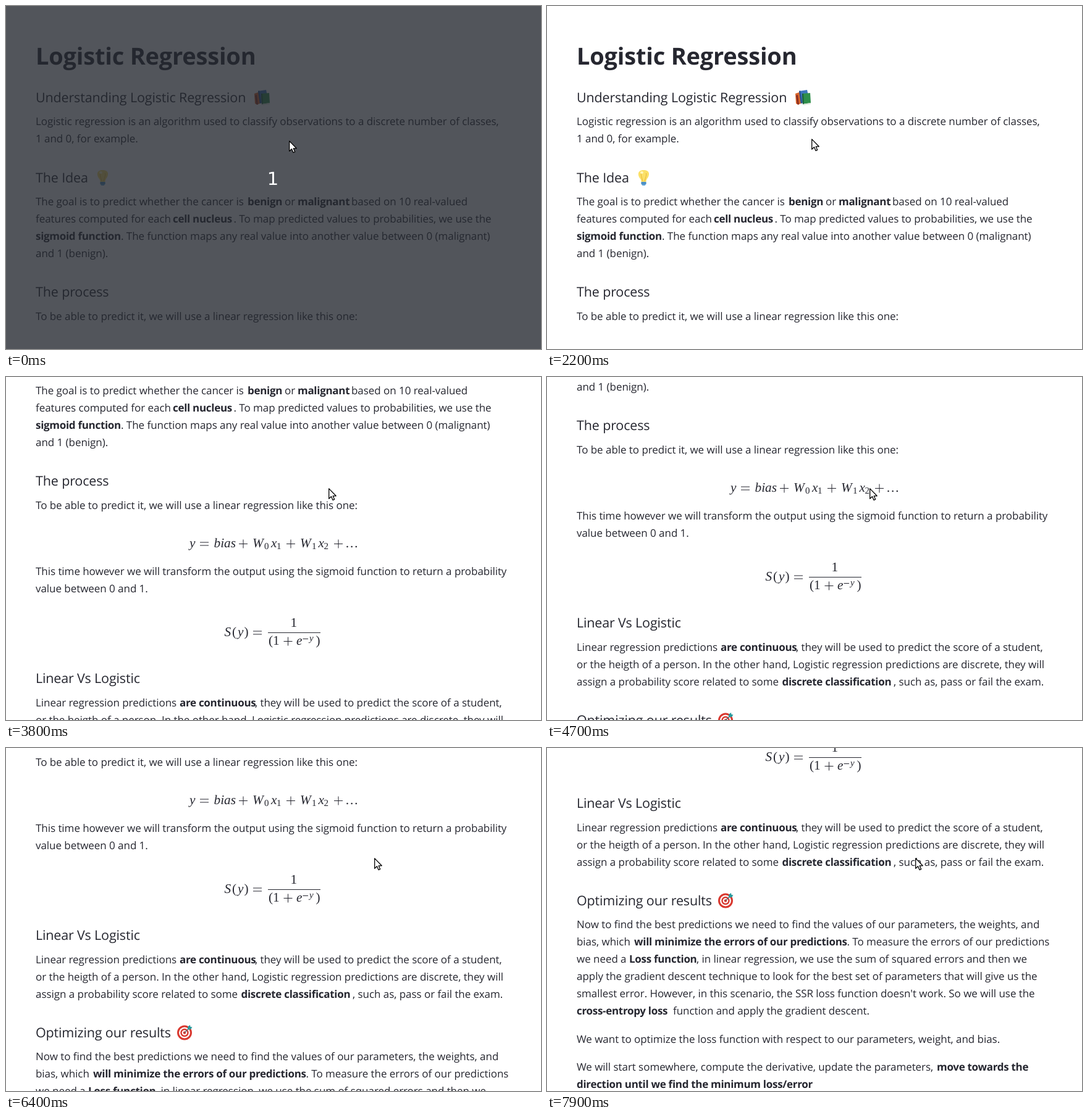
Animation of 866x556 px, one loop 8 s. Source, as an HTML page:

```html
<!DOCTYPE html>
<html lang="en">
<head>
<meta charset="utf-8">
<title>Logistic Regression</title>
<style>
  html, body { margin: 0; width: 100%; height: 100%; overflow: hidden; background: #fff; }
  svg { display: block; width: 866px; height: 556px; }
  text { fill: #262730; text-rendering: geometricPrecision; white-space: pre; }
  .h1, .h3, .p, .b { font-family: "Open Sans", "Noto Sans", sans-serif; }
  .h1 { font-size: 38px; font-weight: 700; letter-spacing: -.2px; }
  .h3 { font-size: 21.5px; font-weight: 500; letter-spacing: -.15px; }
  .p { font-size: 17px; letter-spacing: -.05px; }
  .b { font-size: 17px; font-weight: 700; letter-spacing: -.3px; }
  .m, .v, .s, .sv { font-family: "Liberation Serif", "Noto Serif", serif; }
  .m, .v { font-size: 21.3px; }
  .s, .sv { font-size: 15px; }
  .v, .sv { font-style: italic; }
  .ops { stroke: #262730; stroke-width: 1; fill: none; }
  .count { font: 29px "DejaVu Sans", sans-serif; fill: #fff; text-anchor: middle; }
</style>
</head>
<body>
<svg viewBox="0 0 866 556">
  <g id="page"></g>
  <g id="veil">
    <rect width="866" height="556" fill="rgb(36,40,47)" fill-opacity=".79"/>
    <text class="count" x="432" y="290">1</text>
  </g>
  <path id="arrow" d="M.7 .9V17.3L4.5 13.8 7 19.6 9.7 18.4 7.2 12.8H12.2Z"
        fill="#fff" stroke="#000" stroke-width="1.3" stroke-linejoin="round"/>
  <g id="beam" fill="none">
    <path d="M-3.5 -7H-1L0 -6 1 -7H3.5M0 -6V6M-3.5 7H-1L0 6 1 7H3.5" stroke="#fff" stroke-width="3"/>
    <path d="M-3.5 -7H-1L0 -6 1 -7H3.5M0 -6V6M-3.5 7H-1L0 6 1 7H3.5" stroke="#000" stroke-width="1.3"/>
  </g>
</svg>
<script>
const LOOP = 8000;
const $ = id => document.getElementById(id);

const text = (cls, x, y, s) => `<text class="${cls}" x="${x}" y="${y}">${s}</text>`;
const heading = (y, s) => text('h3', 48, y + 8, s);

// A line is a row of runs: x, string, x, string ... ; "*" marks bold.
function line(y, ...runs) {
  let out = '';
  for (let i = 0; i < runs.length; i += 2) {
    const s = runs[i + 1], bold = s[0] === '*';
    out += text(bold ? 'b' : 'p', runs[i], y + 6, bold ? s.slice(1) : s);
  }
  return out;
}
const para = (y, ...rows) => rows.map((s, i) => line(y + 28 * i, 48, s)).join('');

// Operators are centred on x and the math axis y.
const plus = (x, y) => `M${x - 7} ${y}h14M${x} ${y - 7}v14`;
const equal = (x, y) => `M${x - 7} ${y - 2.5}h14M${x - 7} ${y + 2.5}h14`;
const ops = d => `<path class="ops" d="${d}"/>`;

const linearFormula = [
  text('v', 297, 571, 'y'), text('v', 336.5, 571, 'bias'),
  text('v', 399, 571, 'W'), text('s', 418, 574, '0'),
  text('v', 429, 571, 'x'), text('s', 438, 574, '1'),
  text('v', 476, 571, 'W'), text('s', 495, 574, '1'),
  text('v', 505.5, 571, 'x'), text('s', 514.5, 574, '2'),
  text('m', 549, 571, '…'),
  ops(equal(321, 565.5) + plus(384, 565.5) + plus(461, 565.5) + plus(538, 565.5))
].join('');

const sigmoidFormula = [
  text('v', 353.5, 715, 'S'), text('m', 366, 715, '('),
  text('v', 375, 715, 'y'), text('m', 385.5, 715, ')'),
  text('m', 460.5, 700, '1'),
  text('m', 425, 729, '('), text('m', 432, 729, '1'),
  text('v', 470, 729, 'e'), text('sv', 491, 723, 'y'), text('m', 501.5, 729, ')'),
  ops(equal(407, 709.5) + 'M424 709.5H509' + plus(456.5, 723.5) + 'M480.5 719.5H489')
].join('');

const books = `<g transform="translate(402 136)">
  <path d="M0 6L9 3 14 20 4 24 1 22Z" fill="#d9652b"/>
  <path d="M1 9L3 23 6 24 4 8Z" fill="#8c2f22"/>
  <path d="M6 2L19 0 23 18 9 22Z" fill="#3f76bd"/>
  <path d="M6 2L8 1 11 21 9 22Z" fill="#274f8d"/>
  <path d="M11 6L24 5 25 21 12 23Z" fill="#2f8f4b"/>
  <path d="M11 6L13 6 14 23 12 24Z" fill="#1a5e38"/>
  <path d="M12 23L25 21V23L13 25Z" fill="#dfe5dc"/></g>`;

const bulb = `<g transform="translate(156.5 265)">
  <path d="M0 1C-12 1 -9 11 -5.5 15 -4.5 16.500 -4 18 -4 20H4C4 18 4.500 16.500 5.500 15 9 11 12 1 0 1Z" fill="#fbe067"/>
  <path d="M-4 6C-5 9 -3 13 -1.500 19M4 6C5 9 3 13 1.500 19" fill="none" stroke="#e8b53a"/>
  <ellipse cx="-3" cy="5" rx="2.500" ry="2" fill="#fff6bd"/>
  <path d="M-4 20H4V23.500L2 26H-2L-4 23.500Z" fill="#5b9fd2"/>
  <path d="M-4 22H4" stroke="#3572a8"/></g>`;

const target = '<g transform="translate(289 941.5)">' +
  [[12, '#d9382f'], [9, '#fff'], [6.7, '#d9382f'], [4.3, '#fff'], [2.3, '#d9382f']]
    .map(([r, c]) => `<circle r="${r}" fill="${c}"/>`).join('') +
  `<path d="M0 0L7 -7" stroke="#5a6870" stroke-width="1.500"/>
  <path d="M5 -6L5.500 -10 9 -12.500 9.500 -9.500 12.500 -9 10 -5.500 6 -5Z" fill="#279a9c"/></g>`;

$('page').innerHTML = [
  text('h1', 48, 94.5, 'Logistic Regression'),
  heading(148, 'Understanding Logistic Regression'), books,
  para(187,
    'Logistic regression is an algorithm used to classify observations to a discrete number of classes,',
    '1 and 0, for example.'),
  heading(278, 'The Idea'), bulb,
  line(317, 48, 'The goal is to predict whether the cancer is', 391, '*benign', 451, 'or',
    472, '*malignant', 559, 'based on 10 real-valued'),
  line(345, 48, 'features computed for each', 270, '*cell nucleus',
    368.5, '. To map predicted values to probabilities, we use the'),
  line(373, 48, '*sigmoid function',
    186, '. The function maps any real value into another value between 0 (malignant)'),
  para(401, 'and 1 (benign).'),
  heading(463, 'The process'),
  para(503, 'To be able to predict it, we will use a linear regression like this one:'),
  linearFormula,
  para(610,
    'This time however we will transform the output using the sigmoid function to return a probability',
    'value between 0 and 1.'),
  sigmoidFormula,
  heading(783, 'Linear Vs Logistic'),
  line(823, 48, 'Linear regression predictions', 281, '*are continuous',
    403, ', they will be used to predict the score of a student,'),
  para(851, 'or the heigth of a person. In the other hand, Logistic regression predictions are discrete, they will'),
  line(879, 48, 'assign a probability score related to some', 380.5, '*discrete classification',
    561, ', such as, pass or fail the exam.'),
  heading(941, 'Optimizing our results'), target,
  para(980, 'Now to find the best predictions we need to find the values of our parameters, the weights, and'),
  line(1008, 48, 'bias, which', 141, '*will minimize the errors of our predictions',
    485.5, '. To measure the errors of our predictions'),
  line(1036, 48, 'we need a', 133, '*Loss function',
    242, ', in linear regression, we use the sum of squared errors and then we'),
  para(1064,
    'apply the gradient descent technique to look for the best set of parameters that will give us the',
    "smallest error. However, in this scenario, the SSR loss function doesn't work. So we will use the"),
  line(1120, 48, '*cross-entropy loss', 204, 'function and apply the gradient descent.'),
  para(1166, 'We want to optimize the loss function with respect to our parameters, weight, and bias.'),
  line(1211, 48, 'We will start somewhere, compute the derivative, update the parameters,',
    631, '*move towards the'),
  line(1239, 48, '*direction until we find the minimum loss/error')
].join('');

// [time, scroll offset]
const scrolls = [
  [0, 0], [2800, 3], [2900, 54], [3000, 103], [3100, 104],
  [3500, 115], [3600, 165], [3700, 230], [3800, 295], [3900, 318],
  [4600, 330], [4700, 385], [4800, 421], [5000, 424],
  [6300, 432], [6400, 480], [6500, 540], [6600, 580], [7000, 583],
  [7700, 598], [7800, 645], [7900, 694]
];

// [time, shape, x, y]
const moves = [
  [0, 'arrow', 458, 218], [1200, 'arrow', 436, 207], [1300, 'beam', 362, 182],
  [1400, 'arrow', 270, 164], [1500, 'beam', 182, 180], [1600, 'beam', 128, 212],
  [1700, 'arrow', 109, 240], [1800, 'beam', 114, 276], [1900, 'arrow', 128, 291],
  [2000, 'arrow', 144, 293], [2100, 'arrow', 270, 268], [2200, 'arrow', 428, 215],
  [2300, 'beam', 495, 190], [2400, 'beam', 522, 184], [2600, 'beam', 524, 184],
  [2900, 'arrow', 522, 180], [5000, 'beam', 526, 184], [5800, 'beam', 531, 184],
  [5900, 'beam', 556, 181], [6000, 'beam', 582, 180], [6100, 'beam', 598, 182],
  [6400, 'arrow', 596, 178]
];

const at = (steps, t) => steps.findLast(s => s[0] <= t);

function draw(now) {
  const t = now % LOOP;
  $('page').setAttribute('transform', `translate(0 ${-at(scrolls, t)[1]})`);
  $('veil').style.display = t < 500 ? '' : 'none';
  const [, shape, x, y] = at(moves, t);
  for (const id of ['arrow', 'beam']) $(id).style.display = id === shape ? '' : 'none';
  $(shape).setAttribute('transform', `translate(${x} ${y})`);
}

const start = performance.now();
function tick() {
  draw(performance.now() - start);
  requestAnimationFrame(tick);
}
tick();
</script>
</body>
</html>
```
